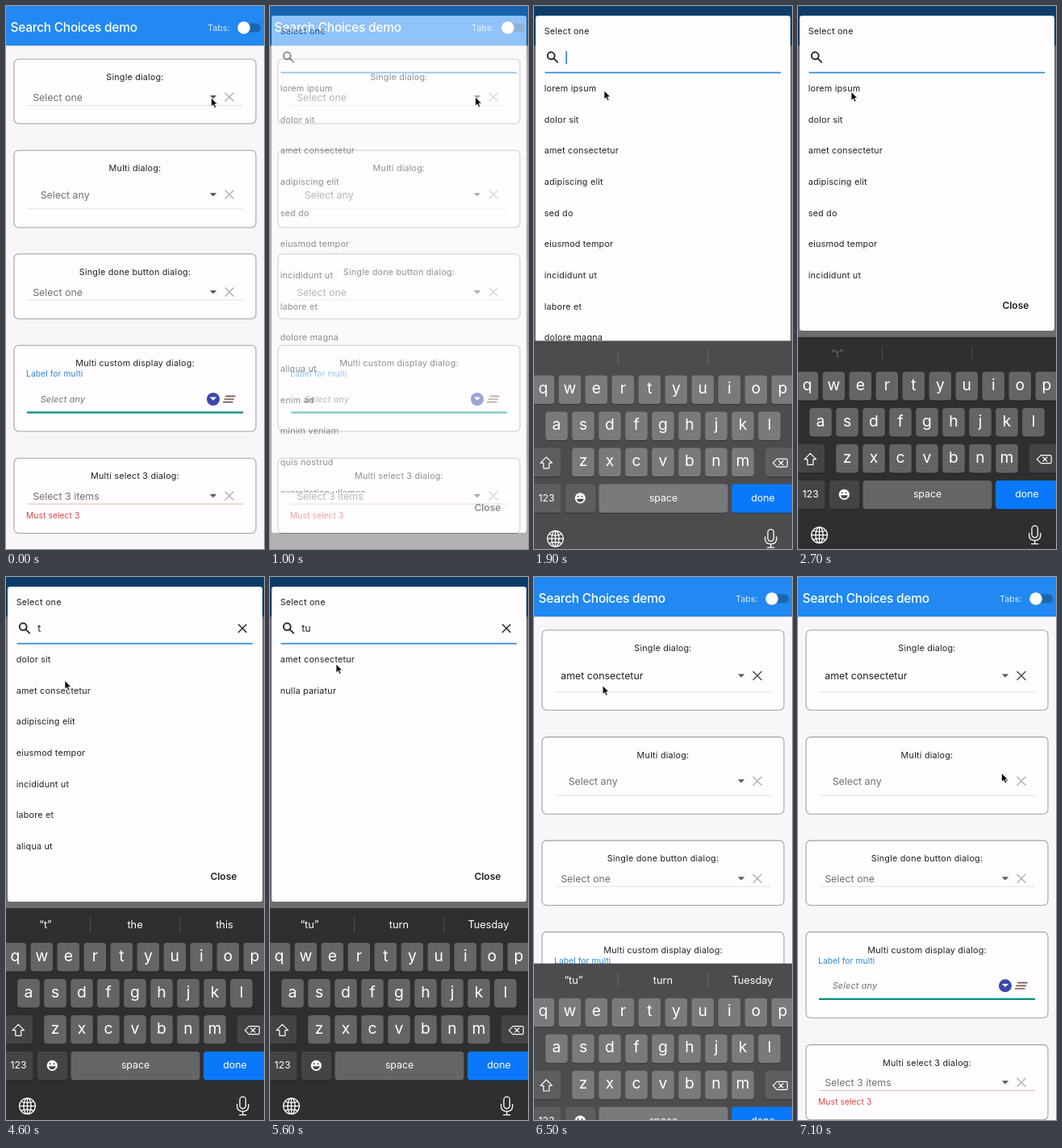
Write an HTML page that moves like this. It is 320 px wide and 674 px high and loops after 7200 ms.

```html
<!DOCTYPE html>
<html lang="en">
<head>
<meta charset="utf-8">
<title>Search choices</title>
<style>
  html, body { margin: 0; width: 100%; height: 100%; overflow: hidden; background: #f8f6f9; }
  svg { display: block; width: 100vw; height: 100vh; }
  text { font-family: Inter, "Liberation Sans", sans-serif; white-space: pre; }
  .body { font-size: 10.82px; letter-spacing: .19px; fill: #202021; }
  .small { font-size: 10.2px; letter-spacing: .12px; }
  .value { font-size: 12.37px; fill: #202021; }
  .hint { fill: #706f71; }
  .mid { text-anchor: middle; }
  .key { font-size: 19.3px; }
  .word { font-size: 12.3px; }
  .line { fill: none; stroke-linecap: round; stroke-linejoin: round; }
</style>
</head>
<body>
<svg id="stage" viewBox="0 0 320 674">
  <defs>
    <clipPath id="listClip"><rect id="listBox" x="2" y="84" width="316" height="520"/></clipPath>
  </defs>
  <g id="page"></g>
  <g id="header">
    <rect y="49" width="320" height="1.2" fill="#000" opacity=".12"/>
    <rect width="320" height="49" fill="#2189f1"/>
    <text x="5.5" y="32.3" font-size="15.46" font-weight="500" letter-spacing="-.25" fill="#fff">Search Choices demo</text>
    <text x="250" y="31" font-size="10.8" fill="#d3e7fc">Tabs:</text>
    <rect x="289" y="21.5" width="27" height="11" rx="5.5" fill="#1a66b0"/>
    <circle cx="295" cy="27.6" r="8" fill="#000" opacity=".18"/>
    <circle cx="295" cy="27" r="7.8" fill="#fff"/>
  </g>
  <g id="modal">
    <rect width="320" height="674" fill="#000" opacity=".56"/>
    <rect id="sheet" x="2" y="12" width="316" height="642" rx="3.2" fill="#fffdff"/>
    <text class="body" x="12.7" y="35">Select one</text>
    <g class="line" stroke="#262627" stroke-width="1.9">
      <circle cx="21.2" cy="61.7" r="4.4"/><path d="M24.6 65.1L29.2 69.7"/>
    </g>
    <text id="query" class="value" x="39.2" y="68"></text>
    <rect id="caret" y="56" width="1.7" height="16" fill="#2f8fdb"/>
    <path id="clear" class="line" d="M288.5 59l9.5 9.5m0-9.5l-9.5 9.5" stroke="#262627" stroke-width="1.5"/>
    <rect x="13.5" y="81.8" width="292.5" height="1.7" fill="#2c8ad6"/>
    <g id="list" clip-path="url(#listClip)"></g>
    <text id="close" x="253.4" font-size="12" font-weight="600" fill="#202021">Close</text>
  </g>
  <g id="keyboard">
    <rect id="tray" y="411" width="320" height="280"/>
    <path d="M104.5 422v19M215.5 422v19" stroke="#fff" stroke-opacity=".15"/>
    <g id="hints"></g>
    <g id="keys"></g>
    <g class="line" stroke="#fff" stroke-width="1.2">
      <path d="M15.3 555.3l7.2 7.4h-3.7v6.6h-7v-6.6h-3.7z"/>
      <path d="M301.4 557.6h11.2q1.6 0 1.6 1.6v6.8q0 1.6-1.6 1.6h-11.2l-5-5zM303.8 560l5.2 5.2m0-5.2l-5.2 5.2"/>
      <g stroke-width="1.3">
        <circle cx="26.5" cy="656.7" r="9.9"/>
        <ellipse cx="26.5" cy="656.7" rx="4.6" ry="9.9"/>
        <path d="M26.5 646.8v19.8M16.6 656.7h19.8M18.5 651q8 3.2 16 0M18.5 662.4q8-3.2 16 0"/>
        <rect x="290" y="645.2" width="7.4" height="14.6" rx="3.7"/>
        <path d="M286.6 654.5v2.2q0 6.6 7.1 6.6t7.1-6.6v-2.2M293.7 663.3v4.3M289.6 667.7h8.2"/>
      </g>
    </g>
    <circle cx="57.3" cy="606.3" r="6.6" fill="#fff"/>
    <g fill="#4a4a4c">
      <circle cx="55" cy="604.2" r="1"/><circle cx="59.6" cy="604.2" r="1"/>
      <path d="M53 607.2h8.6q-.6 3.9-4.3 3.9t-4.3-3.9z"/>
    </g>
  </g>
  <path id="cursor" d="M0 0V10.8L2.5 8.6L4.2 12.5L6.1 11.7L4.4 7.8H7.8Z" fill="#000" stroke="#fff" stroke-width=".8" stroke-linejoin="round"/>
</svg>
<script>
const LOOP = 7200, STEP = 100, ROW = 38.65, GROW = 19.3;
const $ = id => document.getElementById(id);

const ITEMS = ("lorem ipsum,dolor sit,amet consectetur,adipiscing elit,sed do,eiusmod tempor," +
  "incididunt ut,labore et,dolore magna,aliqua ut,enim ad,minim veniam,quis nostrud," +
  "exercitation ullamco,nulla pariatur").split(",");

const label = (x, y, cls, str, extra = "") => `<text x="${x}" y="${y}" class="${cls}" ${extra}>${str}</text>`;
const arrow = (y, fill = "#58575a") => `<path d="M252.8 ${y - 2}h8.4l-4.2 4.2z" fill="${fill}"/>`;
const cross = (y, stroke) =>
  `<path class="line" d="M272 ${y - 5}l10 10m0-10l-10 10" stroke="${stroke}" stroke-width="1.5"/>`;
const rule = (y, fill, h = 1) => `<rect x="26" y="${y}" width="268" height="${h}" fill="${fill}"/>`;
const icons = (y, stroke = "#b3b2b4") => arrow(y) + cross(y, stroke);

function card(top, bottom, title, content) {
  return `<rect x="10" y="${top}" width="300" height="${bottom - top}" rx="5.5" fill="#fffdff" stroke="#a09fa2" stroke-width="1.1"/>` +
    label(160, top + 26, "body mid", title) + content;
}

function pageMarkup(chosen) {
  const dy = chosen ? GROW : 0, y = chosen ? 122.5 : 113, pale = "#e3e2e4";
  const first = card(66, 146 + dy, "Single dialog:",
    label(33.2, y + 4.5, chosen ? "value" : "value hint", chosen ? "amet consectetur" : "Select one") +
    icons(y, chosen ? "#4c4b4e" : undefined) + rule(123 + dy, pale));
  const clearAll = `<path class="line" d="M273 484.3h11M271.2 488h11M269.8 491.7h11" stroke="#795548" stroke-width="1.7"/>`;
  const rest =
    card(179.3, 275, "Multi dialog:",
      label(42.7, 238.5, "value hint", "Select any") + icons(234) + rule(251.3, pale)) +
    card(307.8, 388.2, "Single done button dialog:",
      label(33.2, 359.5, "value hint", "Select one") + icons(355) + rule(364.3, pale)) +
    card(421.3, 528, "Multi custom display dialog:",
      label(25, 460.3, "small", "Label for multi", 'fill="#2d86dc"') +
      label(42.7, 491.8, "body hint", "Select any", 'font-style="italic" style="fill:#706f71"') +
      `<circle cx="257" cy="488" r="8" fill="#3949ab"/>` + arrow(487.6, "#fff") + clearAll +
      rule(503.4, "#079183", 2.3)) +
    card(561.3, 654.5, "Multi select 3 dialog:",
      label(33.2, 612.5, "value hint", "Select 3 items") + icons(608) + rule(617.6, "#e3b5b3") +
      label(25, 635.6, "small", "Must select 3", 'fill="#d9453f"'));
  return `<rect width="320" height="674" fill="#f8f6f9"/>${first}<g transform="translate(0 ${dy})">${rest}</g>`;
}

function listMarkup(query) {
  return ITEMS.filter(s => s.includes(query))
    .map((s, i) => label(12.7, 106 + i * ROW, "body", s)).join("");
}

function keyMarkup() {
  const cap = (x, y, w, fill = "#fff", alpha = .26) =>
    `<rect x="${x}" y="${y + 1}" width="${w}" height="35.5" rx="4" fill="#000" opacity=".32"/>` +
    `<rect x="${x}" y="${y}" width="${w}" height="35.5" rx="4" fill="var(--tray)"/>` +
    `<rect x="${x}" y="${y}" width="${w}" height="35.5" rx="4" fill="${fill}" fill-opacity="${alpha}"/>`;
  const letters = (str, x0, y) => [...str].map((c, i) => {
    const x = x0 + i * 33;
    return cap(x - 13.8, y, 27.6) + label(x, y + 22.7, "key mid", c, 'fill="#fff"');
  }).join("");
  const word = (x, str) => label(x, 610.2, "word mid", str, 'fill="#fff"');
  return letters("qwertyuiop", 11.3, 454) + letters("asdfghjkl", 28, 499) + letters("zxcvbnm", 61, 544) +
    cap(-4, 544, 37, "#fff", .1) + cap(287, 544, 37, "#fff", .1) +
    cap(-4, 589, 37.5, "#fff", .1) + cap(39, 589, 37, "#fff", .1) +
    cap(80.5, 589, 160) + cap(245, 589, 79, "#0a78fb", 1) +
    word(15.5, "123") + word(160.5, "space") + word(284, "done");
}

const clamp = v => Math.min(1, Math.max(0, v));
const ramp = (t, a, b) => clamp((t - a) / (b - a));
const smooth = v => v * v * (3 - 2 * v);
const mix = (a, b, v) => a + (b - a) * v;

// Pointer stops: time, x, y
const PATH = [
  [0, 254.5, 114], [900, 254.5, 114], [1200, 255.3, 110.5], [1600, 255.3, 110.5],
  [1900, 87, 105], [2080, 87, 105], [2400, 66, 106.5], [4000, 66, 106.5], [4400, 73, 128.5],
  [5100, 73, 128.5], [5500, 82, 108], [6050, 82, 108], [6300, 85, 129], [6450, 85, 129],
  [6750, 87, 206], [7100, 252.5, 243.5], [7200, 252.5, 243.5]
];

function pointer(t) {
  const i = Math.max(1, PATH.findIndex(p => p[0] >= t));
  const [a, b] = [PATH[i - 1], PATH[i]], v = smooth(ramp(t, a[0], b[0]));
  return [mix(a[1], b[1], v), mix(a[2], b[2], v)];
}

function trayTop(t) {
  if (t < 2100) return mix(674, 415.5, 1 - (1 - ramp(t, 1600, 1900)) ** 2);
  return mix(411, 676, smooth(ramp(t, 6350, 6800)));
}

function caretOn(t) {
  if (t < 2400) return t >= 1200;
  if (t < 2900) return false;
  return (t - 2900) % 1000 < 500;
}

const shown = {};
function swap(id, state, make) {
  if (shown[id] === state) return;
  shown[id] = state;
  $(id).innerHTML = make(state);
}

function draw(t) {
  const query = t < 2900 ? "" : t < 4900 ? "t" : "tu";
  swap("page", t >= 6100, pageMarkup);
  swap("list", query, listMarkup);
  $("query").textContent = query;
  $("clear").style.display = query ? "" : "none";
  $("caret").setAttribute("x", 39.3 + [0, 4.7, 12.2][query.length]);
  $("caret").style.display = caretOn(t) ? "" : "none";

  const open = ramp(t, 850, 1150) * (1 - ramp(t, 6050, 6250));
  $("modal").style.display = open ? "" : "none";
  $("modal").setAttribute("opacity", open);
  const bottom = mix(654, 403, smooth(ramp(t, 2050, 2300)));
  $("sheet").setAttribute("height", bottom - 12);
  $("listBox").setAttribute("height", bottom - 50 - 84);
  $("close").setAttribute("y", bottom - 27);

  const top = trayTop(t);
  $("keyboard").style.display = top < 674 ? "" : "none";
  $("keyboard").setAttribute("transform", `translate(0 ${top - 411})`);
  const glow = t < 4000 ? 1 - ramp(t, 2050, 2350) : ramp(t, 6050, 6250);
  const grey = Math.round(mix(47, 76, glow));
  $("keyboard").style.setProperty("--tray", `rgb(${grey},${grey},${grey + 2})`);
  $("tray").style.fill = "var(--tray)";

  const words = t < 2700 ? "" : t < 4800 ? "“t”,the,this" : "“tu”,turn,Tuesday";
  swap("hints", words, s => s.split(",").map((w, i) =>
    label(49 + i * 111, 436.4, "mid", w, 'font-size="12.8" fill="#fff"')).join(""));
  [...$("hints").children].forEach((el, i) =>
    el.setAttribute("opacity", ramp(t, 2630 + (i ? 100 : 0), 2880 + (i ? 100 : 0))));

  $("cursor").setAttribute("transform", `translate(${pointer(t)})`);
}

$("keys").innerHTML = keyMarkup();
const start = performance.now();
function tick() {
  const t = (performance.now() - start) % LOOP;
  draw(Math.floor(t / STEP) * STEP);
  requestAnimationFrame(tick);
}
tick();
</script>
</body>
</html>
```
